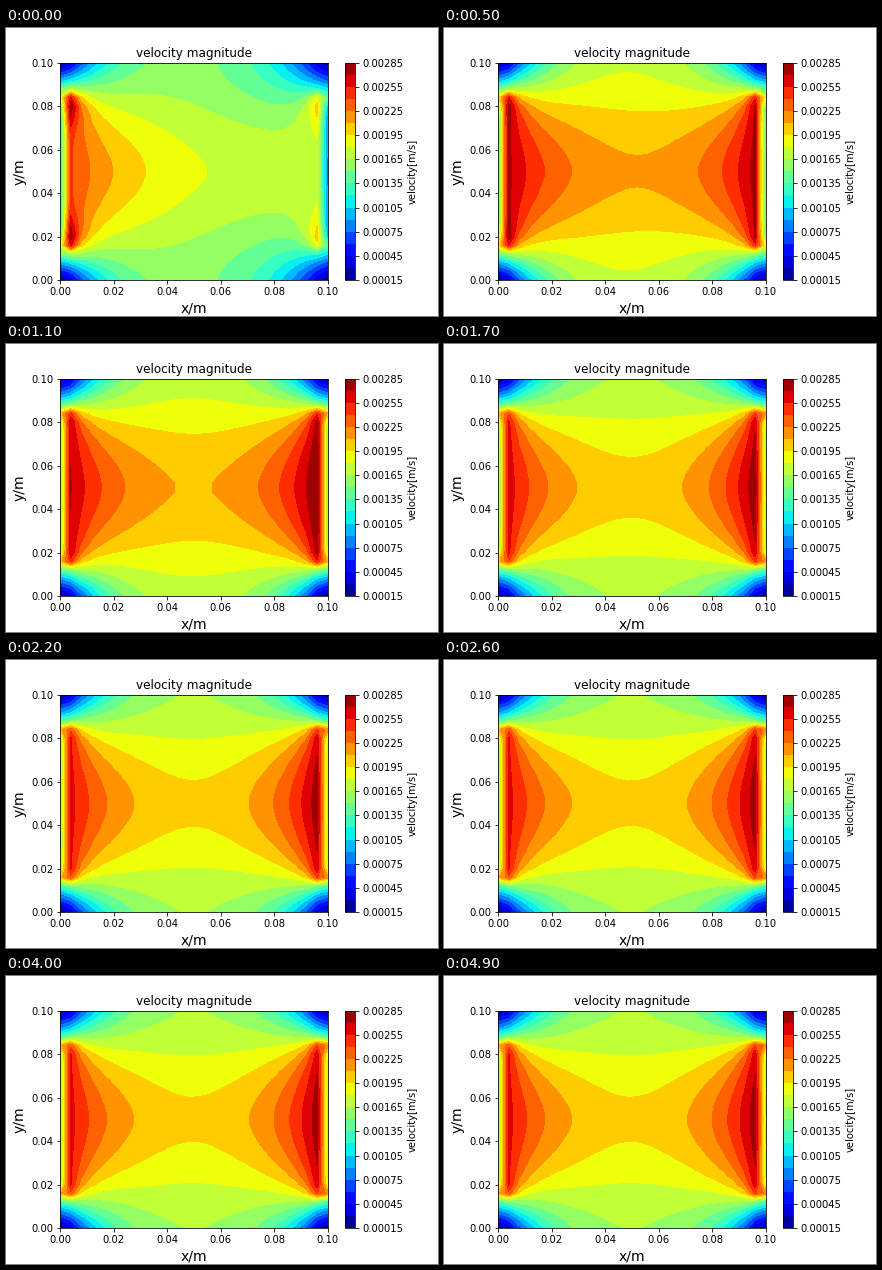
Write a matplotlib script that moves like this. It is 432 px wide and 288 px high and loops after 5000 ms.

```python
import numpy as np
import matplotlib.pyplot as plt
from matplotlib.animation import FuncAnimation

plt.rcParams["font.family"] = "DejaVu Sans"

FRAMES, INTERVAL = 50, 100
STEP = 0.00015     # contour spacing; speeds below are counted in these steps
LEVELS = STEP * np.arange(1, 20)
CELL = 0.04        # grid spacing, relative to the box side
RIM = 0.3385       # half height of the two openings
CORNER_SPEED = 2.2

axis = np.linspace(0, 1, 26)
X, Y = np.meshgrid(axis, axis)
H = np.abs(Y - 0.5)
GAP_L = np.maximum(X - CELL, 0)
GAP_R = np.maximum(1 - X - CELL, 0)


def shelter(gap):
    """0 on the axis, 1 at the side walls, with a sharp step at the rim for gap 0."""
    def root(h):
        rise = (h ** 1.5 - RIM ** 1.5) / (0.5 ** 1.5 - RIM ** 1.5)
        return np.sqrt(rise + 6.25j * gap).real
    low, high = root(0.0), root(0.5)
    return (root(H) - low) / (high - low)


def bow(h):
    """Slowing away from the axis."""
    return 9.4 * h ** 2 - 27 * h ** 4


SHELTER_L, SHELTER_R = shelter(GAP_L), shelter(GAP_R)
RIM_SHAPE = np.exp(-((H - 0.31) / 0.1) ** 2)


def wall_column(inner, edge):
    """Speed on an open wall: low inside the slot, higher at its rims."""
    h = H[:, 0]
    slot = edge + 3.5 * np.exp(-(RIM - h) / 0.03)
    return np.where(h < RIM + CELL / 4, slot, inner - 1)


def speed(t):
    """Flow that starts at the left, overshoots, then settles."""
    fresh = np.exp(-t / 0.3)
    slow = np.exp(-t / 0.6)
    surge = 2.75 * (t / 0.9) * np.exp(-(t / 0.9) ** 2)
    base = 11.5 + surge - 0.5 * fresh
    jet_l, jet_r = 6.7 - 0.85 * fresh, 8.35 - 7.55 * fresh
    bow_l, bow_r = 0.3 * (1 - slow), 1.5 * (1 - slow)

    def centre(x):
        return (base + jet_l * np.exp(-(4 - 0.6 * fresh) * x)
                + jet_r * np.exp(-4.7 * (1 - x)))

    fade = (1 - (1 - bow_l) * np.exp(-GAP_L / 0.06)
            - (1 - bow_r) * np.exp(-GAP_R / 0.06))
    corner_l = centre(CELL) - bow_l * bow(0.5) - CORNER_SPEED
    corner_r = centre(1 - CELL) - bow_r * bow(0.5) - CORNER_SPEED

    u = centre(X) - fade * bow(H)
    u -= corner_l * np.exp(-6.5 * GAP_L) * SHELTER_L
    u -= corner_r * np.exp(-6.5 * GAP_R) * SHELTER_R
    u += fresh * RIM_SHAPE * (2.6 * np.exp(-GAP_L / 0.05)
                              + 1.6 * np.exp(-GAP_R / 0.06))
    u[:, 0] = wall_column(u[:, 1], 10 - 2 * slow)
    u[:, -1] = wall_column(u[:, -2], 11 - 5.5 * slow)
    return STEP * np.clip(u, 1.05, 18.95)


def draw_field(t):
    return ax.contourf(0.1 * X, 0.1 * Y, speed(t), levels=LEVELS, cmap="jet")


fig, ax = plt.subplots(figsize=(6, 4), dpi=72, facecolor="white")
fig.subplots_adjust(left=0.125, right=0.9, bottom=0.125, top=0.88)
bar = fig.colorbar(draw_field(0), ax=ax, ticks=LEVELS[::2], format="%.5f")
bar.set_label("velocity[m/s]", fontsize=10)
ax.set_title("velocity magnitude", fontsize=12)
ax.set_xlabel("x/m", fontsize=14)
ax.set_ylabel("y/m", fontsize=14)
ax.set_xlim(0, 0.1)
ax.set_ylim(0, 0.1)


def update(frame):
    for old in list(ax.collections):
        old.remove()
    return [draw_field(frame * INTERVAL / 1000)]


anim = FuncAnimation(fig, update, frames=FRAMES, interval=INTERVAL,
                     repeat=True, repeat_delay=0, blit=False)
plt.show()
```
